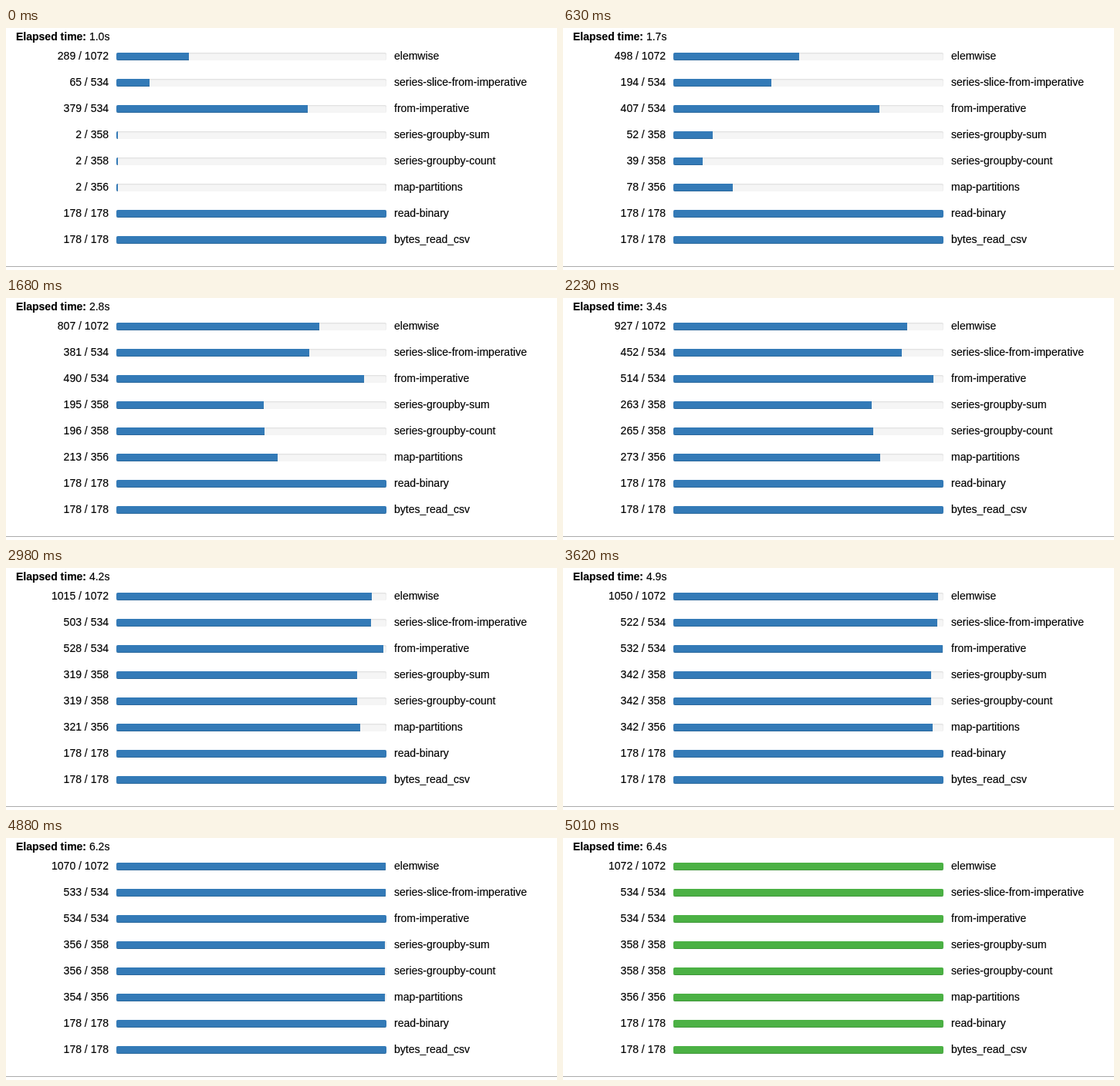
These frames come from a looping animation (714x314 px, 6.57 s). An HTML page:

```html
<!DOCTYPE html>
<html lang="en">
<head>
<meta charset="utf-8">
<title>Task progress</title>
<style>
  html, body { margin: 0; width: 100%; height: 100%; overflow: hidden; background: #fff; }
  body {
    position: relative; color: #000; white-space: pre;
    font: 14px/20px "Liberation Sans", Arial, sans-serif;
    -webkit-text-stroke: .15px;
  }
  #elapsed { position: absolute; left: 13px; top: 1px; }
  .row { position: absolute; left: 0; width: 714px; height: 20px; }
  .count { position: absolute; right: 581px; }
  .name { position: absolute; left: 503px; }
  .track {
    position: absolute; left: 143px; top: 6px; width: 350px; height: 10px; overflow: hidden;
    border-radius: 2px; background: #f5f5f5; box-shadow: inset 0 1px 2px rgba(0, 0, 0, .1);
  }
  .fill { height: 100%; background: #337ab7; box-shadow: inset 0 -1px 0 rgba(0, 0, 0, .15); }
  .done .fill { background: #4bb144; }
  #rule { position: absolute; left: 0; top: 309px; width: 714px; height: 1px; background: #ababab; }
</style>
</head>
<body>
<div id="elapsed"><b>Elapsed time:</b> <span id="clock"></span></div>
<div id="rows"></div>
<div id="rule"></div>
<script>
  const LOOP = 6570, FINISH = 5010, UPDATE = 53.2;

  // The open work of a task decays at a rate that grows after its delay (seconds).
  const tasks = [
    { name: "elemwise", total: 1072, start: 289, delay: 0, rate: .38, growth: .168 },
    { name: "series-slice-from-imperative", total: 534, start: 65, delay: 0, rate: .39, growth: .175 },
    { name: "from-imperative", total: 534, start: 379, delay: .4, rate: .78, growth: .185 },
    { name: "series-groupby-sum", total: 358, start: 2, delay: .2, rate: .265, growth: .19 },
    { name: "series-groupby-count", total: 358, start: 2, delay: .4, rate: .42, growth: .17 },
    { name: "map-partitions", total: 356, start: 2, delay: 0, rate: .27, growth: .17 },
    { name: "read-binary", total: 178, start: 178, delay: 0, rate: 0, growth: 0 },
    { name: "bytes_read_csv", total: 178, start: 178, delay: 0, rate: 0, growth: 0 }
  ];

  const clock = document.getElementById("clock");
  const add = (parent, className, text = "") => {
    const el = parent.appendChild(document.createElement("div"));
    el.className = className;
    el.textContent = text;
    return el;
  };

  const rows = tasks.map((task, i) => {
    const row = add(document.getElementById("rows"), "row");
    row.style.top = 26 + 34 * i + "px";
    const count = add(row, "count");
    const fill = add(add(row, "track"), "fill");
    add(row, "name", task.name);
    return { task, count, fill };
  });

  function completed({ total, start, delay, rate, growth }, seconds) {
    const active = Math.max(0, seconds - delay);
    return total - Math.round((total - start) * Math.exp(-active * (rate + growth * active)));
  }

  function draw(now) {
    const t = now % LOOP;
    const finished = t >= FINISH;
    const seconds = (finished ? FINISH : Math.floor(t / UPDATE + .17) * UPDATE) / 1000;
    clock.textContent = (.99 + seconds * 1.085).toFixed(1) + "s";
    document.body.className = finished ? "done" : "";
    for (const { task, count, fill } of rows) {
      const done = finished ? task.total : completed(task, seconds);
      count.textContent = done + " / " + task.total;
      fill.style.width = 100 * done / task.total + "%";
    }
  }

  const origin = performance.now();
  function tick() {
    draw(performance.now() - origin);
    requestAnimationFrame(tick);
  }
  tick();
</script>
</body>
</html>
```
